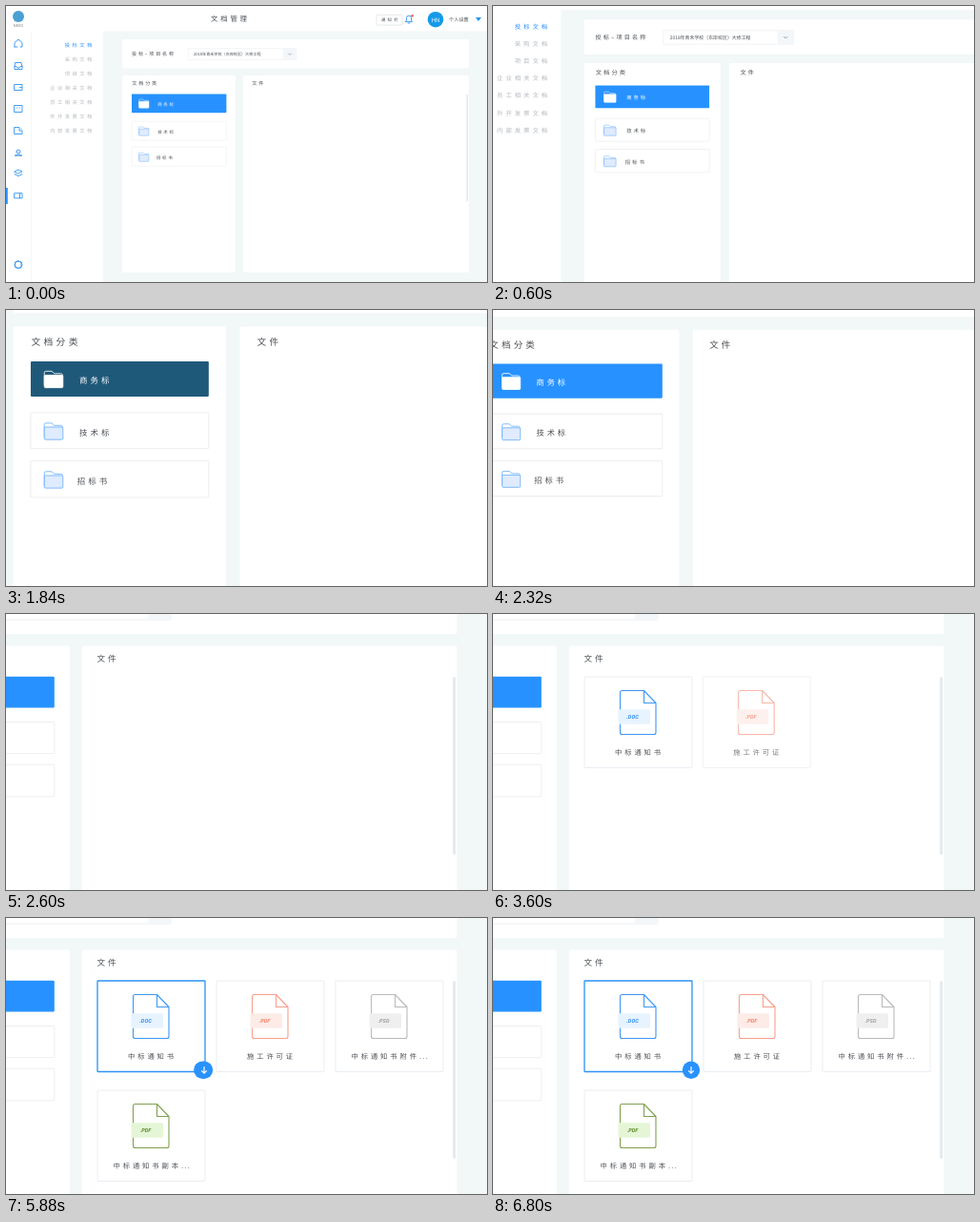
Write an HTML page that moves like this. It is 505 px wide and 290 px high and loops after 8 s.

```html
<!DOCTYPE html>
<html>
<head>
<meta charset="utf-8">
<title>Document manager</title>
<style>
html, body { margin: 0; width: 100%; height: 100%; overflow: hidden; background: #fff; }
svg { display: block; width: 505px; height: 290px; }
text { font-family: "Noto Sans CJK SC", "Noto Sans CJK", "Noto Sans", sans-serif; text-rendering: geometricPrecision; white-space: pre; }
.badge { font: italic bold 5.6px Roboto, "Open Sans", sans-serif; }
.icon { fill: none; stroke: #3295f2; stroke-width: .9; stroke-linejoin: round; stroke-linecap: round; }
</style>
</head>
<body>
<svg id="stage" viewBox="0 0 505 290"></svg>
<script>
const BLUE = '#2792ff', INK = '#4a4f55', DARK = [31, 89, 122], LIGHT = [39, 146, 255];
const HOVER = [44, 147, 245], LINE = [234, 237, 241];

const rect = (x, y, w, h, fill, extra = '') =>
  `<rect x="${x}" y="${y}" width="${w}" height="${h}" fill="${fill}" ${extra}/>`;
// y is the vertical middle of the glyphs
const text = (x, y, size, str, gap = 0, fill = INK, extra = '') =>
  `<text x="${x}" y="${y + size * .37}" font-size="${size}" letter-spacing="${gap}" fill="${fill}" ${extra}>${str}</text>`;
const panel = (x, y, w, h) => rect(x, y, w, h, '#fff', 'rx="1"');
const icon = (y, d) => `<path class="icon" transform="translate(13 ${y})" d="${d}"/>`;

function folder(y, body, line) {
  return `<g transform="translate(139.6 ${y})" stroke="${line}" stroke-width=".45">
    <path d="M0 8V1q0-.8.8-.8h3.3l1.5 1.3h3.6q.9 0 .9.8v1" fill="none"/>
    ${rect(0, 2.4, 10.4, 7, body, 'rx=".6"')}</g>`;
}

function header() {
  return rect(0, 0, 505, 26.5, '#fff') +
    '<circle cx="13" cy="11" r="6" fill="#4aa0d2"/>' +
    text(13, 20.3, 4, 'NEVO', 0, '#777', 'text-anchor="middle"') +
    text(215, 13, 7.4, '文档管理', 2.8) +
    rect(389, 9.3, 27, 10.8, '#fff', 'rx="1" stroke="#dfe4e8" stroke-width=".8"') +
    text(394, 14.6, 4.4, '通知栏', 2.2) +
    '<path class="icon" d="M419.5 16.5h7l-1-1.5v-2.4a2.5 2.5 0 0 0-5 0v2.4zM422 18h2"/>' +
    '<circle cx="426.6" cy="10.3" r="1.2" fill="#f2544f"/>' +
    '<circle cx="451" cy="14.2" r="8.3" fill="#159ae8"/>' +
    text(451, 14.3, 6, 'HN', 0, '#fff', 'text-anchor="middle"') +
    text(465, 14.2, 5.2, '个人设置') +
    '<path d="M493 12h6l-3 4z" fill="#1c95ee"/>';
}

function sidebar() {
  const menu = ['投标文档', '采购文档', '项目文档', '企业相关文档', '员工相关文档', '外开发票文档', '内部发票文档'];
  return rect(0, 0, 102, 290, '#fff') + rect(26, 26, .8, 264, '#f2f6f8') +
    rect(0, 191, 1.8, 17, BLUE) +
    icon(39, 'M-4 4V-.5L0-4l4 3.500V4H2M-4 4h3') +
    icon(63, 'M-3-3.500h6l1 4v3h-8v-3zM-4 .5h2l1 1.500h2l1-1.500h2') +
    icon(85.5, 'M-4-3h8v6h-8zM1.500 0h2') +
    icon(108, 'M-4-3.500h8v7h-8zM-1.500-1h.2M1.300-1h.2') +
    icon(131, 'M-4-3.500h5v3.500h3v3.500h-8zM3-2v.2') +
    icon(154, 'M-2-1a2 2 0 1 0 4 0a2 2 0 1 0-4 0M-3.500 3q3.500-2.500 7 0z') +
    icon(175.500, 'M-4-1.500L0-3.500l4 2L0 .5zM-4 1.200L0 3.200l4-2') +
    icon(199.300, 'M-4-2.600h8v5.200h-8zM1.500-2.600v5.200') +
    icon(271.800, 'M0-4l2.800 1.200L4 0 2.800 2.800 0 4-2.800 2.800-4 0-2.800-2.800zM-3-2.800q3-1.500 6 0v5.600q-3 1.500-6 0z') +
    menu.map((m, i) => text(90.3 - m.length * 7.75 + 2.4, 41 + i * 15.05, 5.3, m, 2.45, i ? '#b4b9bf' : BLUE)).join('');
}

function content() {
  const edge = 'stroke="#eceff2" stroke-width=".6" rx=".5"';
  return panel(122.2, 35, 363.8, 30.5) +
    text(132, 50.5, 5.1, '投标–项目名称', 1.8) +
    rect(191.3, 44.5, 113.7, 12, '#fff', edge) + rect(290.8, 44.7, 14, 11.6, '#f4f7fa') +
    '<path d="M296.300 49.700l1.700 1.700 1.700-1.700" fill="none" stroke="#8a949e" stroke-width=".7"/>' +
    text(197, 50.6, 4.1, '2018年青禾学校（东岸校区）大修工程') +
    panel(122.2, 73, 118.8, 207) + panel(248.8, 73, 237.2, 207) +
    text(132.3, 81.3, 5.2, '文档分类', 1.75) + text(258.3, 81.3, 5.2, '文件', 1.75) +
    rect(483.4, 92.6, 1.8, 112.6, '#e5eaed', 'rx=".9"') +
    rect(132, 92.5, 99.4, 19.7, BLUE, 'id="choice" rx=".6"') +
    rect(132, 121.2, 99.4, 20, '#fff', edge) + rect(132, 148.1, 99.4, 20.3, '#fff', edge) +
    folder(97.8, '#fff', '#fff') + folder(126.8, '#dfebfe', '#6aaefb') + folder(153.9, '#dfebfe', '#6aaefb') +
    text(159.2, 102.9, 4.5, '商务标', 1.6, '#fff', 'font-weight="500"') +
    text(159.2, 132.1, 4.5, '技术标', 1.6) + text(158, 159.5, 4.5, '招标书', 1.6);
}

// x, y, line, badge fill, badge text, type, label, label x
const files = [
  [96, 66, '#3d98f4', '#e7f3fe', '#2f8df0', '.DOC', '中标通知书', 32],
  [221, 66, '#f79f8b', '#fdebe7', '#f5836b', '.PDF', '施工许可证', 32],
  [346, 66, '#bababa', '#efefef', '#a0a0a0', '.PSD', '中标通知书附件', 16.5],
  [96, 181, '#81a04f', '#e5f6d6', '#5f8a2c', '.PDF', '中标通知书副本', 16.5]
];

function card([x, y, line, pale, ink, type, label, lx]) {
  const dots = label.length > 5 ? '<tspan letter-spacing="1.4">...</tspan>' : '';
  return `<g class="card" data-x="${x}" data-y="${y}">
    ${rect(0, 0, 113, 95.5, '#fff', 'class="frame" stroke="#eaedf1" rx=".5"')}
    <path d="M62.500 14.500H39.500q-2 0-2 2v42q0 2 2 2h33.500q2 0 2-2V27.500zV27.500h12.500" fill="none" stroke="${line}" stroke-width="1.100" stroke-linejoin="round"/>
    ${rect(35.500, 34.200, 33.500, 15.500, pale, 'class="plate" rx="1.500"')}
    <text class="badge" x="50.500" y="44" text-anchor="middle" fill="${ink}">${type}</text>
    ${text(lx, 79.5, 7.3, label + dots, 2.9)}</g>`;
}

const stage = document.getElementById('stage');
stage.innerHTML = `<g id="world">${rect(0, 0, 505, 290, '#f2f7f8')}${sidebar()}${header()}${content()}</g>
  ${files.map(card).join('')}
  <g id="load"><rect id="pill" y="150.600" height="18.400" rx="9.200" fill="#2992fc"/>
  ${text(176, 159.8, 8, '下载', 1.5, '#fff', 'id="word"')}
  <path d="M208 156.300v6.700M205.200 160.300l2.800 2.800 2.800-2.800" fill="none" stroke="#fff" stroke-width="1.200"/></g>`;

const $ = s => stage.querySelector(s);
const set = (el, attrs) => { for (const k in attrs) el.setAttribute(k, attrs[k]); };
const world = $('#world'), choice = $('#choice'), load = $('#load'), pill = $('#pill'), word = $('#word');
const cards = [...stage.querySelectorAll('.card')], frame = $('.frame'), plate = $('.plate');

function ease(t, from, to) {
  const p = Math.min(1, Math.max(0, (t - from) / (to - from)));
  return p * p * (3 - 2 * p);
}
const mix = (a, b, p) => a + (b - a) * p;
const blend = (a, b, p) => `rgb(${a.map((v, i) => Math.round(mix(v, b[i], p)))})`;

function draw(t) {
  const zoom = ease(t, 400, 1040), pan = ease(t, 2200, 2600);
  const cam = (a, b, c) => mix(mix(a, b, zoom), c, pan);
  set(world, { transform: `translate(${cam(0, -222.2, -333.3)} ${cam(0, -119.9, -87.7)}) scale(${cam(1, 1.88, 1.66)})` });
  set(choice, { fill: blend(LIGHT, DARK, ease(t, 1680, 1840) - ease(t, 1920, 2080)) });

  cards.forEach((c, i) => {
    const p = ease(t, 3240 + i * 200, 3480 + i * 200);
    set(c, { opacity: p, transform: `translate(${+c.dataset.x - 3 * (1 - p)} ${c.dataset.y})` });
  });

  const hover = ease(t, 4440, 4800), grow = Math.sin(hover * Math.PI);
  set(frame, { stroke: blend(LINE, HOVER, hover), 'stroke-width': 1 + .3 * hover });
  set(plate, { x: 35.5 - grow, y: 34.2 - grow, width: 33.5 + 2 * grow, height: 15.5 + 2 * grow });

  const show = ease(t, 5040, 5360), open = ease(t, 5840, 6120) - ease(t, 6520, 6800);
  set(load, { opacity: show, transform: `translate(208 159.8) scale(${.5 + show / 2}) translate(-208 -159.8)` });
  set(pill, { x: 198.8 - 30.8 * open, width: 18.4 + 30.8 * open });
  set(word, { opacity: open * open });
}

const start = performance.now();
function tick() {
  const t = (performance.now() - start) % 8000;
  draw(Math.floor((t + 1) / 40) * 40);
  requestAnimationFrame(tick);
}
tick();
</script>
</body>
</html>
```
